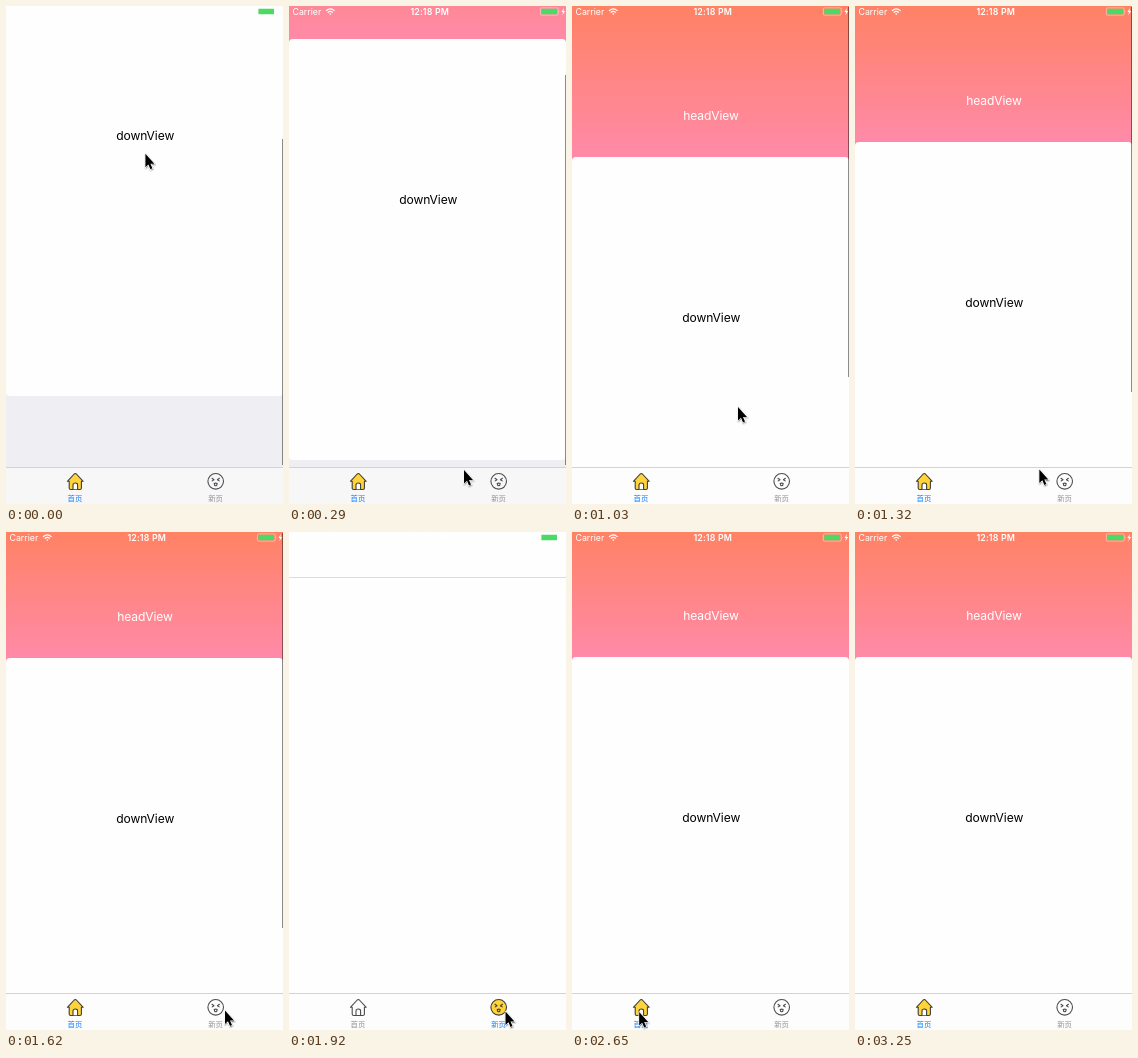
Recreate the animation shown at these times as an HTML page. Size 277 px wide and 498 px high, loop 3.99 s.

```html
<!DOCTYPE html>
<html lang="zh">
<head>
<meta charset="utf-8">
<title>Scroll and tabs</title>
<style>
  html, body { margin: 0; width: 100%; height: 100%; overflow: hidden; background: #fefefe; }
  svg { display: block; width: 100vw; height: 100vh; }
  text { font-family: Inter, Roboto, sans-serif; text-anchor: middle; }
  .title { font-size: 12.1px; letter-spacing: -.1px; }
  .status { font-size: 8.8px; fill: #fff; }
  .tab { --ink: #8f8f94; --fill: none; --line: #4c4c50; }
  .tab.on { --ink: #0a7cff; --fill: #ffd43b; --line: #3f3d38; }
  .tab text { font: 500 7.4px "Noto Sans CJK SC", "Noto Sans CJK", sans-serif; fill: var(--ink); }
  .tab path, .tab circle { fill: none; stroke: var(--line); stroke-width: 1.1; stroke-linecap: round; stroke-linejoin: round; }
  .tab .body { fill: var(--fill); }
  .tab.on .door { fill: #fff; }
</style>
</head>
<body>
<svg viewBox="0 0 277 498" preserveAspectRatio="none">
  <defs>
    <linearGradient id="warm" gradientUnits="userSpaceOnUse" x1="0" x2="0" y2="0">
      <stop offset="0" stop-color="#ff8264"/>
      <stop offset="1" stop-color="#ff8aa8"/>
    </linearGradient>
    <path id="arrow" d="M0 0V13.4L3 10.8L5 15.4L7 14.5L5 10H9Z"/>
  </defs>

  <g id="home">
    <rect width="277" height="498" fill="#eeeef3"/>
    <g id="scroll">
      <rect y="-200" width="277" height="206" fill="url(#warm)"/>
      <text class="title" x="139" y="-37.2" fill="#fff">headView</text>
      <rect width="277" height="421" rx="4" fill="#fefefe"/>
      <text class="title" x="139.2" y="165.2" fill="#000">downView</text>
    </g>
    <rect id="bar" x="276" width="1" fill="#000" fill-opacity=".45"/>
  </g>

  <g id="fresh">
    <rect width="277" height="498" fill="#fefefe"/>
    <rect y="45" width="277" height="1" fill="#dcdcdc"/>
  </g>

  <g>
    <text class="status" x="3.5" y="8.9" style="text-anchor:start">Carrier</text>
    <g fill="none" stroke="#fff" stroke-width="1.2">
      <path d="M37 4.9Q41.3 .9 45.6 4.9M38.7 6.6Q41.3 4.2 43.9 6.6"/>
      <path d="M40.1 7.7Q41.3 6.6 42.5 7.7L41.3 9Z" fill="#fff" stroke="none"/>
    </g>
    <text class="status" x="140.7" y="8.9" font-weight="600" letter-spacing=".15">12:18 PM</text>
    <rect x="251.4" y="1.9" width="17.8" height="7.2" rx="1.2" fill="none" stroke="#fff" stroke-width=".8" stroke-opacity=".5"/>
    <rect x="252.4" y="2.7" width="15.6" height="5.5" rx=".4" fill="#4cd964"/>
    <path d="M269.9 4.2q1.2 1.2 0 2.6z" fill="#fff" fill-opacity=".5"/>
    <path d="M274.9 2L272.4 6H274L273.3 9.2L276.2 5H274.4Z" fill="#fff"/>
  </g>

  <rect id="tabs" y="461" width="277" height="37"/>
  <rect y="461" width="277" height="1" fill="#d3d3d6"/>
  <g id="tabHome" class="tab">
    <path class="body" d="M61.4 475.3L68.2 468Q69.3 467 70.4 468L77.2 475.3H75.4V482Q75.4 483.5 73.9 483.5H64.7Q63.2 483.5 63.2 482V475.3Z"/>
    <path class="door" d="M67 483.3V479Q67 477 69.3 477T71.6 479V483.3"/>
    <text x="69" y="495.2">首页</text>
  </g>
  <g id="tabNew" class="tab">
    <circle class="body" cx="209.7" cy="475.3" r="7.8"/>
    <path d="M206 472.3L208 473.7L206.2 474.9M213.4 472.3L211.4 473.7L213.2 474.9"/>
    <path d="M208.2 477.5Q209.7 476.7 211.2 477.5Q211.1 479.8 209.7 479.8T208.2 477.5Z"/>
    <text x="209.6" y="495.2">新页</text>
  </g>

  <g id="cursor" stroke-linejoin="round">
    <use href="#arrow" x=".4" y=".9" stroke="#000" stroke-opacity=".12" stroke-width="3"/>
    <use href="#arrow" stroke="#fff" stroke-width="1.5" paint-order="stroke"/>
  </g>
</svg>

<script>
const LOOP = 3990;
const BEAT = 147.5;            // the picture holds for one beat
const LOW = 40, REST = 126;    // card top at both ends of the scroll

// beats at which something happens
const PULL = 6, RELEASE = 8, NEW_PAGE = 12, BACK = 18, LEAVE = 22;

// pointer path: beat, x, y
const path = [
  [0, 139.4, 147.8], [1, 155, 242], [2, 175, 464],
  [6, 164.4, 262.5], [7, 166, 401], [8, 167, 456],
  [11, 219, 478.5], [13, 216.5, 479.5],
  [15, 92.5, 480], [17, 67, 480], [20, 67.5, 480], [21, 88, 481.5]
];

const el = id => document.getElementById(id);
const show = (id, on) => el(id).setAttribute('visibility', on ? 'visible' : 'hidden');
const move = (id, x, y) => el(id).setAttribute('transform', `translate(${x} ${y})`);
const clamp = (v, lo, hi) => Math.min(hi, Math.max(lo, v));

function pointer(n) {
  const next = path.findIndex(p => p[0] >= n);
  if (next < 1) return path.at(next).slice(1);
  const [a, b] = [path[next - 1], path[next]];
  const u = (n - a[0]) / (b[0] - a[0]);
  return [1, 2].map(i => a[i] + (b[i] - a[i]) * u);
}

// the card bounces back to LOW, is pulled past REST, then springs back to it
function cardTop(n) {
  if (n >= BACK) return REST - 1;
  if (n <= PULL) return Math.round(LOW - 71 * Math.exp(-1.16 * n));
  const pull = n < RELEASE ? 25 * (n - PULL) : 50 * Math.exp(-1.6 * (n - RELEASE));
  return Math.round(REST + pull);
}

function barAlpha(n) {
  if (n >= BACK) return 0;
  return n > PULL ? 1 : clamp((PULL - n) / 2, 0, 1);
}

function drawHome(n) {
  const top = cardTop(n), low = top <= LOW;
  move('scroll', 0, top);
  el('warm').setAttribute('y1', -Math.max(REST, top));
  el('tabs').setAttribute('fill', low ? '#f7f7f8' : '#fdfdfd');
  // the bar shrinks against either end while the card is past it
  const start = low ? 102 - top : 1;
  const end = low ? 459 : 522 - top;
  el('bar').setAttribute('y', start);
  el('bar').setAttribute('height', end - start);
  el('bar').setAttribute('opacity', barAlpha(n));
}

function draw(time) {
  const n = Math.floor((time + 10) / BEAT);
  const home = n < NEW_PAGE || n >= BACK;
  show('home', home);
  show('fresh', !home);
  el('tabHome').classList.toggle('on', home);
  el('tabNew').classList.toggle('on', !home);
  if (home) drawHome(n);
  else el('tabs').setAttribute('fill', '#fdfdfd');
  show('cursor', n < LEAVE);
  move('cursor', ...pointer(n));
}

const origin = performance.now();
function tick() {
  draw((performance.now() - origin) % LOOP);
  requestAnimationFrame(tick);
}
tick();
</script>
</body>
</html>
```
